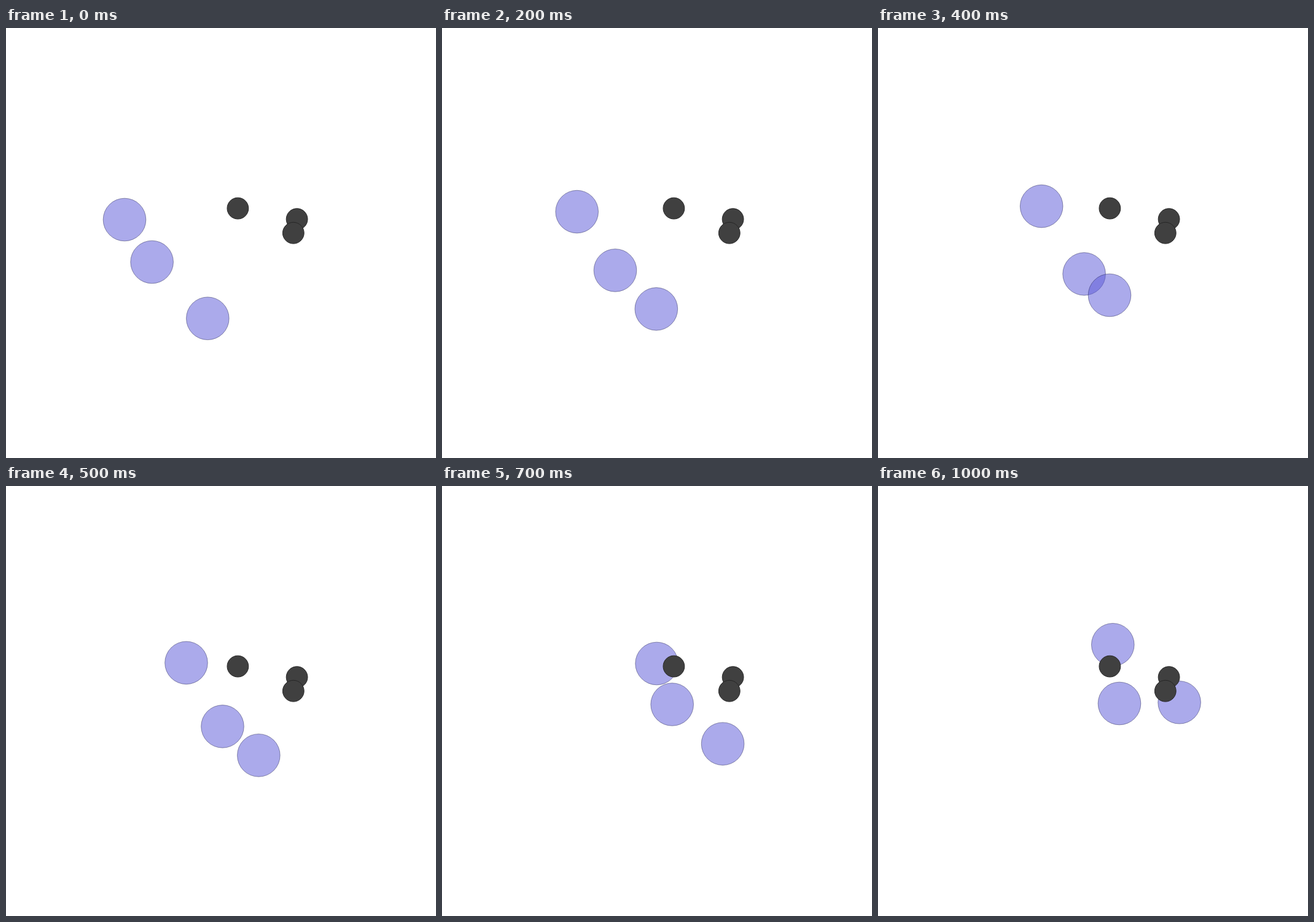
Animation of 700 by 700 pixels, one loop 1100 ms. Source, as an HTML page with a canvas:

```html
<!DOCTYPE html>
<html lang="en">
<head>
<meta charset="utf-8">
<title>Attracted discs</title>
<style>
  html, body { margin: 0; width: 100%; height: 100%; overflow: hidden; background: #fff; }
  canvas { display: block; width: 700px; height: 700px; }
</style>
</head>
<body>
<canvas id="stage" width="700" height="700"></canvas>
<script>
const ctx = document.getElementById('stage').getContext('2d');
const STEP = 100, STEPS = 11;

// Each disc flies along Bézier arcs; a new arc begins at a collision.
// "until" is the step at which an arc ends, "bend" holds its control points.
const movers = [
  { from: [193, 312], arcs: [
    { until: 8, bend: [[210.7, 293.1], [309.5, 278.9]], to: [375.7, 293] },
    { until: 10, bend: [[385, 266.4]], to: [382.3, 258.3] }
  ] },
  { from: [237.6, 381], arcs: [
    { until: 4, bend: [[277.4, 398.3]], to: [335.6, 400.4] },
    { until: 8, bend: [[361.3, 393.3], [373.4, 365.4]], to: [381.8, 331.5] },
    { until: 10, bend: [[391, 346.3]], to: [393, 354] }
  ] },
  { from: [328.3, 472.8], arcs: [
    { until: 4, bend: [[345, 460.9]], to: [377, 435] },
    { until: 10, bend: [[454.8, 452.1], [474.8, 404.6]], to: [490.6, 352.3] }
  ] }
];
const anchors = [[377.4, 293.6], [473.6, 311.2], [467.8, 333.7]];

const mix = (a, b, s) => a.map((v, i) => v + (b[i] - v) * s);

// De Casteljau: blend neighbours until one point is left.
function bezier(pts, s) {
  while (pts.length > 1) pts = pts.slice(1).map((p, i) => mix(pts[i], p, s));
  return pts[0];
}

function position({ from, arcs }, t) {
  let begin = 0;
  for (const { until, bend, to } of arcs) {
    if (t <= until) return bezier([from, ...bend, to], (t - begin) / (until - begin));
    begin = until;
    from = to;
  }
  return from;
}

function disc([x, y], r, fill, edge) {
  ctx.beginPath();
  ctx.arc(x, y, r, 0, Math.PI * 2);
  ctx.fillStyle = fill;
  ctx.fill();
  ctx.strokeStyle = edge;
  ctx.stroke();
}

const start = performance.now();

function draw() {
  const t = Math.floor((performance.now() - start) / STEP) % STEPS;
  ctx.clearRect(0, 0, 700, 700);
  for (const m of movers) disc(position(m, t), 34.8, 'rgba(88,86,216,0.5)', 'rgba(30,30,80,0.45)');
  for (const a of anchors) disc(a, 17.4, '#404040', '#262626');
  requestAnimationFrame(draw);
}
draw();
</script>
</body>
</html>
```
